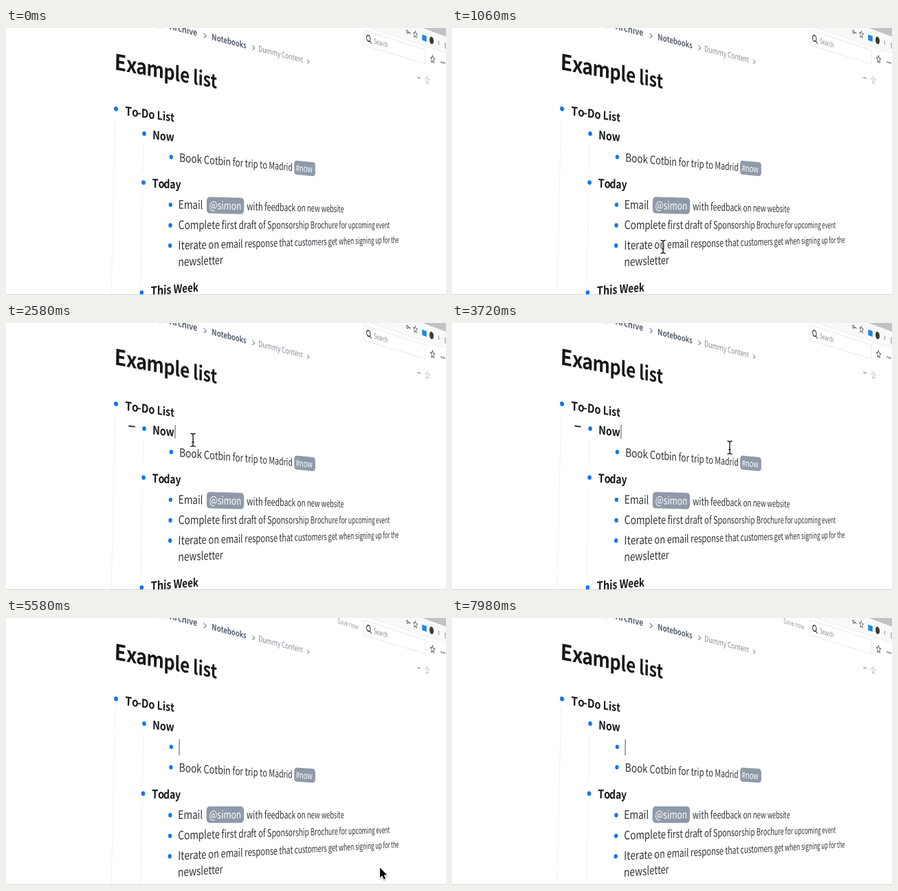
Recreate the animation shown at these times as an HTML page with a canvas. Size 640 by 388 pixels, loop 8 s.

```html
<!DOCTYPE html>
<html lang="en">
<head>
<meta charset="utf-8">
<title>Example list</title>
<style>
  html, body { margin: 0; width: 100%; height: 100%; overflow: hidden; background: #fff; }
  canvas { display: block; width: 640px; height: 388px; }
</style>
</head>
<body>
<canvas id="stage" width="640" height="388"></canvas>
<script>
const ctx = document.getElementById('stage').getContext('2d');
const LOOP = 8000;
const FAMILY = '"Noto Sans CJK JP", "Noto Sans CJK SC", "Noto Sans CJK", "Noto Sans", sans-serif';
const INK = '#16181b', BODY = '#303439', BLUE = '#1474f4', BADGE = '#8f9aa9';
const GUIDE = '#f0f1f3', MUTED = '#838b94', CRUMB = '#566070';

const HOVER = 2000, CLICK = 2480, ARROW = 4250, ENTER = 5250, BLINK = 1130;
const ROW = 24.8;

// Tilted page: plane (u, v) to screen, seen in perspective around (ox, oy).
const cam = { ox: 251, oy: 287, ax: 0.9775, ay: -0.016, by: 1.19, g: 0.000864, h: -0.0000896 };

function project(u, v) {
  const w = 1 + cam.g * u + cam.h * v;
  return { x: cam.ox + (cam.ax * u + cam.ay * v) / w, y: cam.oy + cam.by * v / w, w };
}

function unproject(x, y) {
  const X = x - cam.ox, Y = y - cam.oy;
  const a = cam.ax - X * cam.g, b = cam.ay - X * cam.h;
  const c = -Y * cam.g, d = cam.by - Y * cam.h;
  const det = a * d - b * c;
  return { u: (X * d - b * Y) / det, v: (a * Y - c * X) / det };
}

// Sets the local affine view of the plane at (u, v).
function tilt(u, v) {
  const { x, y, w } = project(u, v);
  const X = x - cam.ox, Y = y - cam.oy;
  ctx.setTransform(
    (cam.ax - X * cam.g) / w, -Y * cam.g / w,
    (cam.ay - X * cam.h) / w, (cam.by - Y * cam.h) / w, x, y);
}

function flat(x = 0, y = 0) { ctx.setTransform(1, 0, 0, 1, x, y); }

// Draws with the origin at screen point (x, y), moved down the page by dv.
function at(x, y, dv, draw) {
  const p = unproject(x, y);
  tilt(p.u, p.v + dv);
  draw();
  flat();
}

const advances = new Map();
function offsets(str, font) {
  const key = font + str;
  if (!advances.has(key)) {
    advances.set(key, [...str].map((_, i) => ctx.measureText(str.slice(0, i)).width));
  }
  return advances.get(key);
}

function text(str, x, y, size, color, dv = 0, weight = 400) {
  const p = unproject(x, y);
  ctx.font = `${weight} ${size}px ${FAMILY}`;
  ctx.fillStyle = color;
  const steps = offsets(str, ctx.font);
  [...str].forEach((ch, i) => {
    tilt(p.u + steps[i], p.v + dv);
    ctx.fillText(ch, 0, 0);
  });
  flat();
}

const body = (str, x, y, dv) => text(str, x, y, 14.35, BODY, dv);
const head = (str, x, y, dv) => text(str, x, y, 14, INK, dv, 700);

function disc(x, y, r, color, dv = 0) {
  at(x, y, dv, () => {
    ctx.fillStyle = color;
    ctx.beginPath();
    ctx.arc(0, 0, r, 0, 7);
    ctx.fill();
  });
}

const bullet = (x, y, dv) => disc(x, y, 2.65, BLUE, dv);

function badge(x, y, w, h, dv) {
  at(x, y, dv, () => {
    ctx.fillStyle = BADGE;
    ctx.beginPath();
    ctx.roundRect(-w / 2, -h / 2, w, h, 5);
    ctx.fill();
  });
}

// Vertical page line starting at (x, y) down to the height of y2.
function guide(x, y, y2, dv1, dv2) {
  const p = unproject(x, y), q = unproject(x, y2);
  const a = project(p.u, p.v + dv1), b = project(p.u, q.v + dv2);
  ctx.strokeStyle = GUIDE;
  ctx.lineWidth = 1;
  ctx.beginPath();
  ctx.moveTo(a.x, a.y);
  ctx.lineTo(b.x, b.y);
  ctx.stroke();
}

function chevron(x, y) {
  at(x, y, 0, () => {
    ctx.strokeStyle = MUTED;
    ctx.lineWidth = 1.3;
    ctx.beginPath();
    ctx.moveTo(-2, -3.2);
    ctx.lineTo(2, 0);
    ctx.lineTo(-2, 3.2);
    ctx.stroke();
  });
}

function star(x, y, r, color) {
  at(x, y, 0, () => {
    ctx.strokeStyle = color;
    ctx.lineWidth = 1.4;
    ctx.beginPath();
    for (let i = 0; i < 10; i++) {
      const a = i * Math.PI / 5 - Math.PI / 2, k = i % 2 ? r * 0.48 : r;
      ctx.lineTo(k * Math.cos(a), k * Math.sin(a));
    }
    ctx.closePath();
    ctx.stroke();
  });
}

function dots(x, y, dx, dy, color) {
  at(x, y, 0, () => {
    ctx.fillStyle = color;
    for (let i = -1; i <= 1; i++) {
      ctx.beginPath();
      ctx.arc(i * dx, i * dy, 1.6, 0, 7);
      ctx.fill();
    }
  });
}

function bar(x, y, w, h, color, dv = 0) {
  at(x, y, dv, () => {
    ctx.fillStyle = color;
    ctx.fillRect(-w / 2, -h / 2, w, h);
  });
}

function browserBar() {
  ctx.fillStyle = '#f8f9f9';
  ctx.strokeStyle = '#e1e3e6';
  ctx.lineWidth = 1;
  ctx.beginPath();
  ctx.moveTo(531, 0);
  ctx.lineTo(640, 36.5);
  ctx.stroke();
  ctx.lineTo(640, 0);
  ctx.fill();

  ctx.fillStyle = '#c0c2c4';
  ctx.beginPath();
  ctx.moveTo(606, 0);
  ctx.lineTo(640, 12.5);
  ctx.lineTo(640, 0);
  ctx.fill();

  at(585, 6, 0, () => {
    ctx.strokeStyle = '#666';
    ctx.lineWidth = 1.7;
    ctx.beginPath();
    ctx.arc(-2.5, 0, 2.6, 0, 7);
    ctx.moveTo(0, 0);
    ctx.lineTo(6, 0);
    ctx.lineTo(6, 2.5);
    ctx.stroke();
  });
  star(595.5, 9.5, 6.6, '#666');
  bar(608.5, 14.8, 14.5, 10.5, '#1e88e5');
  disc(619, 18, 7, '#403a2c');
  bar(629.5, 21.5, 1.8, 8, '#777');
  dots(639, 25.5, 0, 4, '#777');
}

function tools(saved) {
  ctx.strokeStyle = '#e6e8eb';
  ctx.lineWidth = 1;
  ctx.beginPath();
  ctx.moveTo(521, 3);
  ctx.lineTo(610, 32);
  ctx.lineTo(610, 52);
  ctx.lineTo(520, 25);
  ctx.closePath();
  ctx.stroke();

  at(527.5, 15.5, 0, () => {
    ctx.strokeStyle = '#3f444a';
    ctx.lineWidth = 2;
    ctx.beginPath();
    ctx.arc(-0.5, -0.5, 5, 0, 7);
    ctx.moveTo(3, 3.2);
    ctx.lineTo(7.5, 7);
    ctx.stroke();
  });
  text('Search', 535, 22.3, 12.4, MUTED);
  if (saved) text('Save now', 482, 7.5, 11.7, '#949aa1');

  star(620.5, 45.5, 7.4, '#3c4146');
  dots(635.5, 50.3, 5.6, 0, '#3c4146');
  bar(600.5, 72.5, 10, 1.7, '#7c8085');
  star(613, 76, 7.3, '#bcc0c4');
}

function crumbs() {
  chevron(225.5, -3);
  text('Archive', 238, 1.8, 11.5, CRUMB, 0, 700);
  chevron(289.5, 11.2);
  text('Notebooks', 299, 17.2, 11.3, CRUMB, 0, 700);
  chevron(360, 29);
  text('Dummy Content', 367, 34, 11.7, MUTED);
  chevron(439.5, 49);
}

function list(shift) {
  guide(158.5, 131, 420, 0, shift);
  guide(199.9, 167, 208, 0, shift);
  guide(198.6, 237, 373, shift, shift);

  text('Example list', 157.5, 60.2, 25.2, INK, 0, 700);

  bullet(160, 117.5);
  head('To-Do List', 173.3, 126.7);
  bullet(201, 153.5);
  head('Now', 213, 161.5);

  bullet(240.3, 187.5, shift);
  body('Book Cotbin for trip to Madrid', 252, 194.2, shift);
  badge(434.5, 204, 45, 20.5, shift);
  text('#now', 421.5, 208.2, 13.8, '#fff', shift);

  bullet(200, 224.5, shift);
  head('Today', 212.5, 231.7, shift);

  bullet(239.3, 256.8, shift);
  body('Email', 250.5, 262.5, shift);
  badge(319, 258, 63, 21.5, shift);
  text('@simon', 295.5, 263.2, 14.1, '#fff', shift);
  body('with feedback on new website', 350, 264.8, shift);

  bullet(239, 286.7, shift);
  body('Complete first draft of Sponsorship Brochure for upcoming event', 250.5, 292.3, shift);

  bullet(238.6, 316.3, shift);
  body('Iterate on email response that customers get when signing up for the', 250.3, 322.1, shift);
  body('newsletter', 250.2, 346.2, shift);

  bullet(197.3, 384.5, shift);
  head('This Week', 210.5, 388.7, shift);
}

// Pointer stops: time, x, y.
const beamPath = [[600, 332, 402], [1060, 307, 318], [2000, 267, 171], [2450, 270, 169], [2580, 272, 170], [3300, 404, 181]];
const arrowPath = [[ARROW, 404, 181], [4720, 488, 325], [5580, 544, 363], [6300, 566, 395]];

function along(path, t) {
  const last = path[path.length - 1];
  if (t >= last[0]) return last.slice(1);
  const i = Math.max(1, path.findIndex(k => k[0] > t));
  const [a, b] = [path[i - 1], path[i]];
  const s = Math.max(0, (t - a[0]) / (b[0] - a[0]));
  const e = s * s * (3 - 2 * s);
  return [a[1] + (b[1] - a[1]) * e, a[2] + (b[2] - a[2]) * e];
}

function beam(x, y) {
  flat(x, y);
  ctx.beginPath();
  for (const s of [-1, 1]) {
    ctx.moveTo(-3.6, s * 9.5);
    ctx.quadraticCurveTo(0, s * 9.5, 0, s * 7);
    ctx.quadraticCurveTo(0, s * 9.5, 3.6, s * 9.5);
  }
  ctx.moveTo(0, -8);
  ctx.lineTo(0, 8);
  ctx.moveTo(-1.8, 3);
  ctx.lineTo(1.8, 3);
  ctx.strokeStyle = '#fff';
  ctx.lineWidth = 3;
  ctx.stroke();
  ctx.strokeStyle = '#222';
  ctx.lineWidth = 1.4;
  ctx.stroke();
  flat();
}

function arrow(x, y) {
  flat(x, y);
  const pts = [[0, 0], [0, 14.3], [3.2, 11.2], [5.7, 16.8], [8, 15.8], [5.7, 10.4], [10, 10.1]];
  ctx.beginPath();
  pts.forEach(p => ctx.lineTo(...p));
  ctx.closePath();
  ctx.strokeStyle = '#fff';
  ctx.lineWidth = 2;
  ctx.shadowColor = 'rgba(0, 0, 0, 0.35)';
  ctx.shadowBlur = 2;
  ctx.shadowOffsetY = 1;
  ctx.stroke();
  ctx.shadowColor = 'transparent';
  ctx.fillStyle = '#000';
  ctx.fill();
  flat();
}

const lit = (t, start) => t >= start && (t - start) % BLINK < BLINK / 2;

function draw(t) {
  const added = t >= ENTER;
  flat();
  ctx.fillStyle = '#fff';
  ctx.fillRect(0, 0, 640, 388);

  browserBar();
  crumbs();
  tools(added);
  list(added ? ROW : 0);

  if (added) {
    bullet(240.3, 187.3);
    if (lit(t, ENTER)) bar(252, 188, 1.1, 19.8, '#5c5f62');
  } else {
    if (t >= HOVER) bar(183, 150.2, 8.6, 1.7, '#3a3d41');
    if (lit(t, CLICK)) bar(246, 158, 1.1, 17, '#5c5f62');
    if (t >= beamPath[0][0]) beam(...along(beamPath, t));
  }
  if (t >= ARROW) arrow(...along(arrowPath, t));

  ctx.fillStyle = '#d4d6d7';
  ctx.fillRect(0, 387, 640, 1);
}

ctx.textRendering = 'geometricPrecision';
const start = performance.now();
function tick() {
  draw((performance.now() - start) % LOOP);
  requestAnimationFrame(tick);
}
tick();
</script>
</body>
</html>
```
